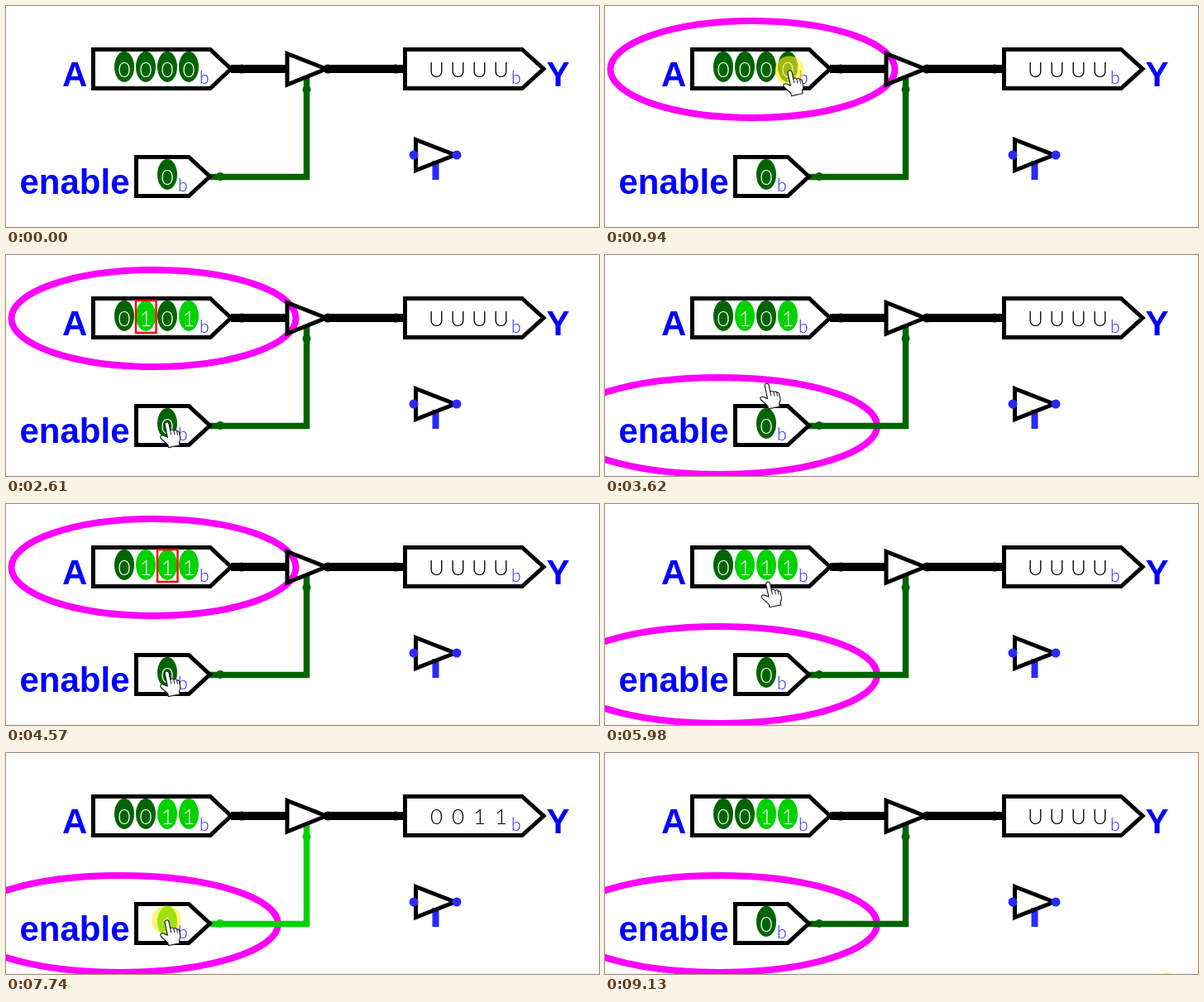
Animation, 717 px wide and 267 px high, one loop 9.26 s. Source, as an HTML page:

```html
<!DOCTYPE html>
<html lang="en">
<head>
<meta charset="utf-8">
<title>Tri-state buffer</title>
<style>
  html, body { margin: 0; width: 100%; height: 100%; overflow: hidden; background: #fff; }
  svg { display: block; width: 717px; height: 267px; }
  .label { font: bold 42px "Liberation Sans", Arial, sans-serif; fill: #00f; }
  .radix { font: 300 21px Lato, "Liberation Serif", serif; fill: #22f; }
  .digit { font: 300 26px Lato, "Liberation Serif", serif; text-anchor: middle; }
  .ring { fill: none; stroke: #f0f; stroke-width: 8; }
  .outline { fill: none; stroke: #000; stroke-width: 5; }
</style>
</head>
<body>
<svg viewBox="0 0 717 267">
  <path d="M0 266.5H717" stroke="#eee"/>
  <ellipse id="ringA" class="ring" cx="178.5" cy="76.5" rx="172" ry="58.5"/>
  <ellipse id="ringE" class="ring" cx="138" cy="206.5" rx="191" ry="58.5"/>

  <path d="M272 76H340M387 76H482" stroke="#000" stroke-width="10"/>
  <circle cx="285" cy="76" r="5.5"/><circle cx="389" cy="76" r="5.5"/><circle cx="471" cy="76" r="5.5"/>
  <g id="enableWire">
    <path d="M246 206.5H363.5V84" fill="none" stroke="currentColor" stroke-width="7.5"/>
    <circle cx="259" cy="206" r="5" fill="currentColor"/>
    <circle cx="363.5" cy="101" r="5" fill="currentColor"/>
  </g>
  <path class="outline" d="M340 57.5L387 76L340 95Z"/>

  <path class="outline" d="M105.5 52.5H247L272 76L247 99.5H105.5Z"/>
  <path class="outline" d="M157.5 182.5H221L246.5 206L221 229.5H157.5Z"/>
  <path class="outline" d="M482.5 52.5H624L650 76L624 99.5H482.5Z"/>

  <rect x="515.5" y="187" width="8" height="23" fill="#2a2aff"/>
  <path class="outline" d="M495.5 161.5L543 180L495.5 198.5Z"/>
  <g fill="#2a2aff"><circle cx="493" cy="180" r="5.5"/><circle cx="545" cy="180" r="5.5"/></g>

  <text class="label" x="68" y="97">A</text>
  <text class="label" x="16.5" y="227">enable</text>
  <text class="label" x="653.5" y="97">Y</text>
  <g id="values"></g>
  <text class="radix" x="234" y="94">b</text>
  <text class="radix" x="208" y="224">b</text>
  <text class="radix" x="611" y="94">b</text>
  <rect id="selection" y="55" width="24.5" height="39" fill="none" stroke="#f01010" stroke-width="2.5"/>

  <g id="cursor">
    <circle id="press" r="17.5" fill="#ffee20" opacity=".62"/>
    <g transform="rotate(-12)" stroke="#222">
      <path d="M-2.5 18V2.5a2.5 2.5 0 0 1 5 0V11q3-2 4 1q3-1.5 3.5 1.5q3-.5 2.5 3.5v5q0 2-2.5 5v3.5H-4V27L-10.5 18q-1.5-4 3-3.5Z"
            fill="#fff" stroke-width="1.2" stroke-linejoin="round"/>
      <path d="M2.5 11V16M6.5 12V17M10 13.5V18"/>
    </g>
  </g>
</svg>
<script>
const LOOP = 9260, LEAD = 120, RELEASE = 60;
const ON = '#00d200', OFF = '#006400';
const ENABLE = 'enable', OUTSIDE = 'outside';
const $ = id => document.getElementById(id);
const bits = [0, 1, 2, 3];
const bitX = i => 143 + 26 * i;

function place(target) {
  if (target === ENABLE) return { x: 194, y: 202 };
  if (target === OUTSIDE) return { x: 679, y: 283 };
  return { x: bitX(target) + 2, y: 78 };
}

// The pointer's tour; everything else follows from its clicks.
const visit = (target, arrive, click) => ({ target, arrive, click, leave: click ? click + RELEASE : arrive, ...place(target) });
const tour = [
  visit(3, 860, 1000), visit(1, 1400, 1540),
  visit(ENABLE, 2340, 2750), visit(ENABLE, 3290, 3350),
  visit(2, 3850, 4030),
  visit(ENABLE, 4570, 5050), visit(ENABLE, 5320, 5650),
  visit(2, 6060), visit(1, 6500, 6610), visit(2, 6950),
  visit(ENABLE, 7600, 7740), visit(ENABLE, 8130, 8200),
  visit(OUTSIDE, 8470, 9250)
];
const entry = { x: 440, y: 285, leave: 0 };
const clicks = tour.filter(stop => stop.click);

function pointerAt(t) {
  let from = entry;
  for (const to of tour) {
    if (t < to.arrive) {
      const dx = to.x - from.x, dy = to.y - from.y;
      const depart = Math.max(from.leave, to.arrive - 120 - 2.2 * Math.hypot(dx, dy));
      const p = Math.max(0, (t - depart) / (to.arrive - depart));
      const eased = p * p * (3 - 2 * p);
      return [from.x + dx * eased, from.y + dy * eased];
    }
    from = to;
  }
  return [from.x, from.y];
}

function stateAt(t) {
  const state = { input: [0, 0, 0, 0], enabled: 0, selected: -1, ring: '', pressed: false };
  for (const { target, click } of clicks) {
    if (t < click - LEAD) break;
    state.pressed = t < click + RELEASE;
    if (target !== OUTSIDE) state.ring = target === ENABLE ? 'E' : 'A';
    if (t < click) break;
    state.selected = bits.indexOf(target);
    if (target === ENABLE) state.enabled ^= 1;
    else if (state.selected >= 0) state.input[target] ^= 1;
  }
  return state;
}

function add(name, attrs) {
  const el = document.createElementNS('http://www.w3.org/2000/svg', name);
  for (const key in attrs) el.setAttribute(key, attrs[key]);
  return $('values').appendChild(el);
}

function makeBit(x, y) {
  return {
    oval: add('ellipse', { cx: x, cy: y, rx: 12, ry: 18.5 }),
    text: add('text', { class: 'digit', x, y: y + 12, fill: '#fff' })
  };
}

function setBit(bit, value) {
  bit.oval.setAttribute('fill', value ? ON : OFF);
  bit.text.textContent = value;
}

const show = (el, visible) => el.setAttribute('visibility', visible ? 'visible' : 'hidden');
const inputBits = bits.map(i => makeBit(bitX(i), 73.5));
const enableBit = makeBit(195, 203.5);
const outputs = bits.map(i => add('text', { class: 'digit', x: bitX(i) + 377.5, y: 86 }));

function draw(t) {
  const { input, enabled, selected, ring, pressed } = stateAt(t);
  bits.forEach(i => {
    setBit(inputBits[i], input[i]);
    outputs[i].textContent = enabled ? input[i] : 'U';
  });
  setBit(enableBit, enabled);
  $('enableWire').setAttribute('color', enabled ? ON : OFF);

  show($('selection'), selected >= 0);
  $('selection').setAttribute('x', bitX(selected) - 12);
  show($('ringA'), ring === 'A');
  show($('ringE'), ring === 'E');
  show($('press'), pressed);
  $('cursor').setAttribute('transform', `translate(${pointerAt(t)})`);
}

const begin = performance.now();
function tick() {
  draw((performance.now() - begin) % LOOP);
  requestAnimationFrame(tick);
}
tick();
</script>
</body>
</html>
```
